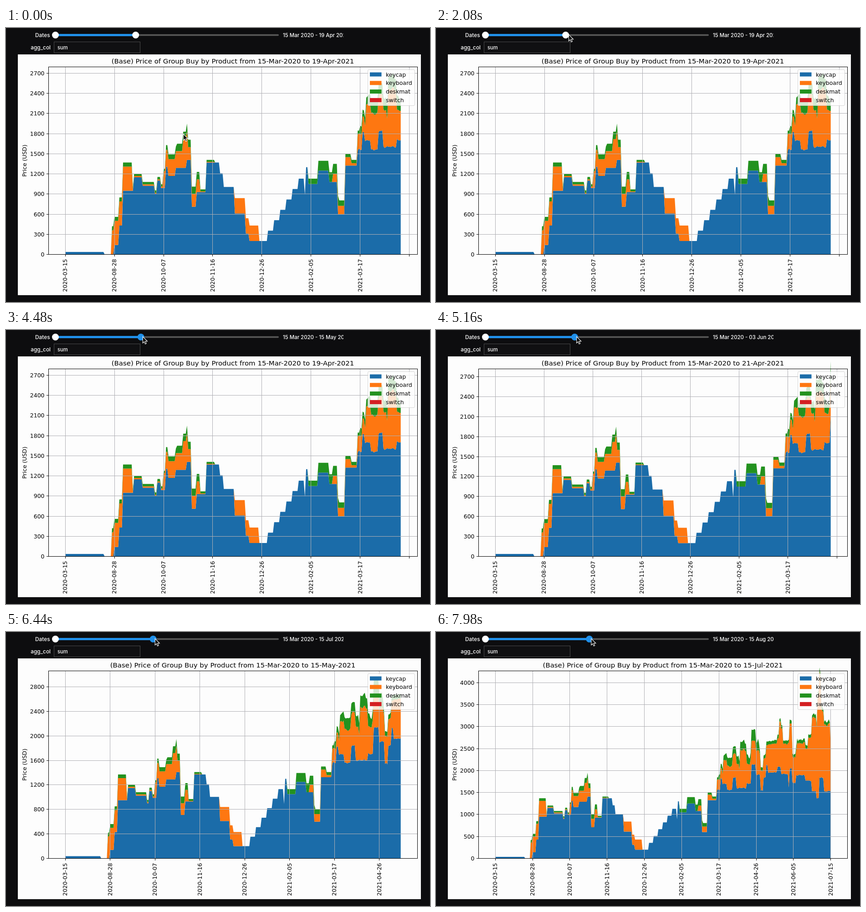
These frames come from a looping animation (931x602 px, 8 s). An HTML page:

```html
<!DOCTYPE html>
<html lang="en">
<head>
<meta charset="utf-8">
<title>Group buy prices</title>
<style>
html, body { margin: 0; width: 100%; height: 100%; overflow: hidden; background: #0d0d0f; }
svg { display: block; width: 931px; height: 602px; }
.ui { font: 500 11.8px Inter, sans-serif; fill: #fff; }
.plot { font: 12.45px "DejaVu Sans", sans-serif; fill: #000; }
.title { font-size: 14.95px; }
.mid { text-anchor: middle; }
.end { text-anchor: end; }
</style>
</head>
<body>
<svg viewBox="0 0 931 602">
  <defs><clipPath id="readoutClip"><rect x="600" y="0" width="141" height="30"/></clipPath></defs>
  <rect width="931" height="602" fill="#0d0d0f"/>
  <g class="ui">
    <text class="end" x="96.5" y="19.7">Dates</text>
    <text class="end" x="98" y="46.7">agg_col</text>
    <rect x="105.5" y="30.5" width="189" height="24" fill="#101012" stroke="#4b4b4b"/>
    <text x="113" y="46.7" font-size="11.2">sum</text>
    <g clip-path="url(#readoutClip)"><text id="readout" x="608" y="19.7" font-size="11.45"></text></g>
  </g>
  <rect x="108" y="13.7" width="491" height="3.6" rx="1.8" fill="#595959"/>
  <rect id="range" x="108" y="13" width="100" height="5" fill="#2090ea"/>
  <circle cx="108.5" cy="15.5" r="7.5" fill="#fff"/>
  <circle id="knob" cy="15.5" r="7.5"/>
  <rect x="26" y="58" width="885" height="529" fill="#fdfdfd"/>
  <g class="plot">
    <g id="areas"></g>
    <path id="grid" fill="none" stroke="#afafb4"/>
    <path id="ticks" fill="none" stroke="#000"/>
    <rect x="93.5" y="85.5" width="810" height="412" fill="none" stroke="#000"/>
    <g id="labels"></g>
    <text id="title" class="title mid" x="498" y="77.7"></text>
    <text class="mid" transform="translate(44.5 291.5) rotate(-90)">Price (USD)</text>
    <rect x="794.5" y="91.5" width="103" height="79" rx="2.5" fill="#fff" fill-opacity=".8" stroke="#ccc" stroke-opacity=".8"/>
    <g id="legend"></g>
  </g>
  <path id="cursor" d="M0 0V14L3.2 11L5.4 16L7.8 15L5.6 10.1H10Z" fill="#000" stroke="#fff" stroke-width="1.1"/>
</svg>
<script>
const $ = id => document.getElementById(id);
const LOOP = 8000, DAY = 864e5, DAYS = 361;
const LEFT = 93.5, RIGHT = 903.5, TOP = 85.5, BASE = 497.5, X0 = 130.3, SPAN = 736.4;
const names = ['keycap', 'keyboard', 'deskmat', 'switch'];
const colors = ['#1b6ca9', '#fe7711', '#23921f', '#d41f22'];

let seed = 7;
const random = () => (seed = seed * 16807 % 2147483647) / 2147483647;

// Plateaus from key points: each (day, price) holds until the next
function plateaus(...keys) {
  const row = new Array(DAYS).fill(0);
  for (let k = 0; k < keys.length; k += 2) row.fill(keys[k + 1], keys[k]);
  return row;
}
// Busy spring: prices flutter from day to day
const flutter = (row, amount) => row.map((v, i) => i < 238 ? v : v * (1 + amount * (random() - .5)));
// Winter recovery: an even staircase
const recover = row => row.map((v, i) => i < 165 || i > 194 ? v : 200 + 155 * Math.ceil((i - 164) / 5));

const keycap = recover(plateaus(0, 37, 32, 0, 40, 140, 44, 430, 47, 950, 56, 1150, 63, 1025, 73, 900,
  75, 1100, 78, 990, 82, 1310, 84, 1170, 90, 1290, 99, 1410, 103, 710, 107, 930, 115, 1370, 126, 1210,
  129, 1005, 138, 610, 147, 310, 150, 200, 195, 890, 196, 1300, 198, 1050, 206, 1250, 215, 1080,
  222, 600, 228, 1325, 238, 1565, 242, 1820, 244, 1695, 249, 1560, 255, 1840, 259, 1600, 270, 1710,
  275, 2130, 280, 1910, 285, 1550, 288, 1845, 291, 2120, 293, 1960, 303, 2080, 307, 1920, 315, 1620,
  316, 2050, 319, 1720, 323, 1900, 333, 1760, 340, 1540, 345, 1370, 348, 1840, 353, 1530));
const keyboard = plateaus(38, 360, 55, 20, 80, 250, 96, 430, 100, 190, 110, 10, 122, 0, 138, 230, 158, 0,
  218, 125, 233, 35, 238, 230, 245, 540, 262, 400, 263, 860, 270, 440, 274, 540, 284, 440, 293, 650,
  305, 1040, 309, 690, 315, 1000, 319, 580, 324, 740, 336, 980, 340, 1670, 346, 2350, 350, 1530, 360, 1030);
const deskmat = plateaus(38, 60, 55, 35, 82, 70, 91, 110, 110, 30, 122, 0, 198, 80, 206, 145, 223, 80,
  228, 50, 240, 130, 249, 170, 275, 220, 284, 75, 359, 20);
const prices = [flutter(keycap, .02), flutter(keyboard, .06), flutter(deskmat, .5)];

// Running sums, layer by layer
const stacks = [new Array(DAYS).fill(0)];
prices.forEach((row, s) => stacks.push(row.map((v, i) => v + stacks[s][i])));

const iso = ms => new Date(ms).toISOString().slice(0, 10);
function longDate(ms, sep) {
  const [y, m, d] = iso(ms).split('-');
  return [d, 'JanFebMarAprMayJunJulAugSepOctNovDec'.substr(3 * m - 3, 3), y].join(sep);
}
const START = Date.UTC(2020, 2, 15);
// Days without any sale are absent from the axis.
const dayAt = i => i ? Date.UTC(2020, 7, 28) + (i - 40 + (i > 160)) * DAY : START;

$('legend').innerHTML = names.map((n, i) =>
  `<rect x="799" y="${97.5 + i * 18.8}" width="25.5" height="9" fill="${colors[i]}"/>` +
  `<text x="834" y="${106.6 + i * 18.8}">${n}</text>`).join('');

const snap = v => Math.floor(v) + .5;
let shown = 0;
function drawPlot(last, yMax) {
  if (last === shown) return;
  shown = last;
  const step = [300, 400, 500].find(s => yMax / s < 10);
  const x = i => +(X0 + i * SPAN / last).toFixed(2);
  const y = v => +(BASE - v * (BASE - TOP) / yMax).toFixed(2);
  const edge = row => row.slice(0, last + 1).map((v, i) => x(i) + ' ' + y(v));
  $('areas').innerHTML = prices.map((_, s) =>
    `<path fill="${colors[s]}" d="M${edge(stacks[s + 1]).join('L')}L${edge(stacks[s]).reverse().join('L')}Z"/>`).join('');

  let grid = '', ticks = '', labels = '';
  for (let i = 0; x(i) < RIGHT; i += 40) {
    const px = snap(x(i));
    grid += `M${px} ${TOP}V${BASE}`;
    ticks += `M${px} ${BASE}v4.5`;
    if (i <= last) labels += `<text class="end" transform="translate(${x(i) + 4} 507.5) rotate(-90)">${iso(dayAt(i))}</text>`;
  }
  for (let v = 0; v < yMax; v += step) {
    const py = snap(y(v));
    grid += `M${LEFT} ${py}H${RIGHT}`;
    ticks += `M${LEFT} ${py}h-4.5`;
    labels += `<text class="end" x="84.5" y="${y(v) + 4.5}">${v}</text>`;
  }
  $('grid').setAttribute('d', grid);
  $('ticks').setAttribute('d', ticks);
  $('labels').innerHTML = labels;
  $('title').textContent =
    `(Base) Price of Group Buy by Product from ${longDate(START, '-')} to ${longDate(dayAt(last), '-')}`;
}

const lerp = (a, b, f) => a + (b - a) * f;
const smooth = f => f * f * (3 - 2 * f);
const progress = (t, from, to) => Math.min(1, Math.max(0, (t - from) / (to - from)));

const PRESS = 2900;
// [time, days selected]
const drag = [[0, 400], [3540, 400], [5160, 445], [6440, 487], [LOOP, 518]];
// The plot lags behind the slider: [time, last day, axis top]
const redraws = [[0, 273, 2795], [4600, 275, 2816], [5450, 299, 3060], [6500, 326, 3338], [7540, 360, 4268]];

function selectedDays(t) {
  const k = drag.findIndex(key => key[0] > t);
  const [t0, a] = drag[k - 1], [t1, b] = drag[k];
  return Math.round(lerp(a, b, progress(t, t0, t1)));
}

function render(t) {
  const days = selectedDays(t);
  const knobX = 108.5 + days * .4405;
  const color = t < PRESS ? '#fff' : '#2090ea';
  $('range').setAttribute('width', knobX - 108);
  $('knob').setAttribute('cx', knobX);
  $('knob').setAttribute('fill', color);
  $('readout').textContent = longDate(START, ' ') + ' - ' + longDate(START + days * DAY, ' ');

  const reach = smooth(progress(t, 0, 1400));
  const settle = smooth(progress(t, 2300, PRESS));
  const px = lerp(389.5, knobX + lerp(6.8, 4.2, settle), reach);
  $('cursor').setAttribute('transform', `translate(${px} ${lerp(233, 14.7, reach)})`);

  const [, last, yMax] = redraws.filter(r => r[0] <= t).pop();
  drawPlot(last, yMax);
}

const t0 = performance.now();
function tick(now) {
  render(Math.max(0, now - t0) % LOOP);
  requestAnimationFrame(tick);
}
render(0);
requestAnimationFrame(tick);
</script>
</body>
</html>
```
